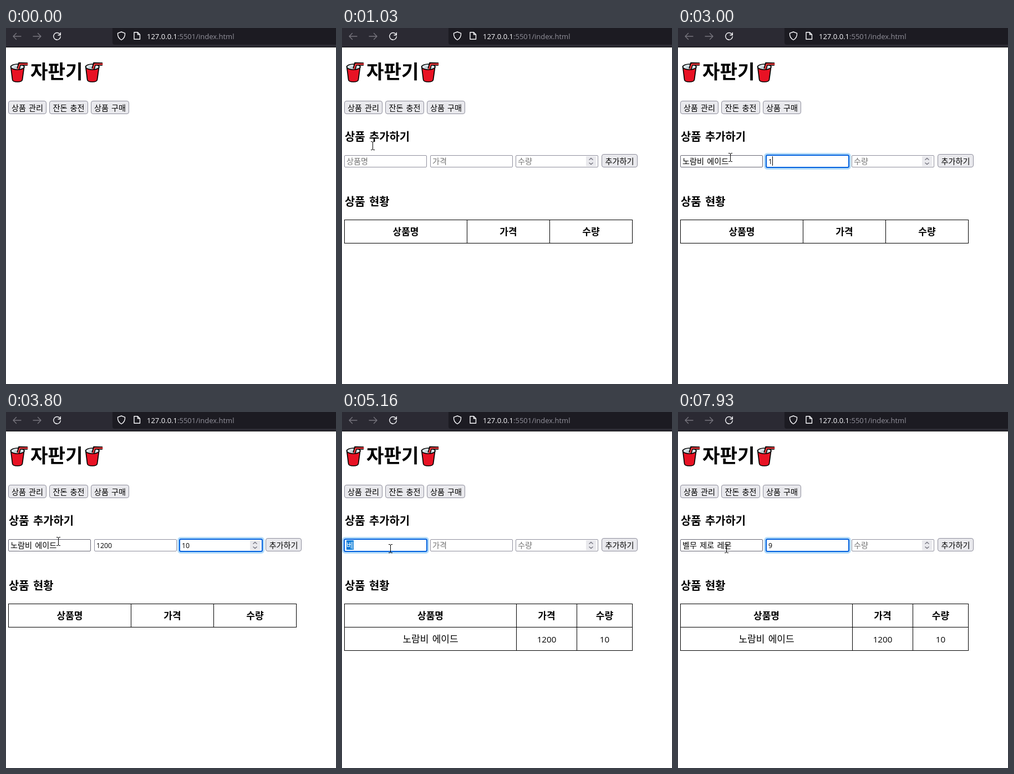
An HTML page for the animation above (7990 ms loop, 595 by 641 pixels).

```html
<!DOCTYPE html>
<html lang="ko">
<head>
<meta charset="utf-8">
<title>자판기</title>
<style>
html, body { margin: 0; width: 100%; height: 100%; overflow: hidden; background: #fff; }
svg { display: block; }
text { font: 14.13px "Noto Sans CJK KR", "Noto Sans KR", sans-serif; word-spacing: .09em; white-space: pre; }
.mid { text-anchor: middle; }
.bold { font-weight: 700; }
.h1 { font-size: 34.3px; }
.h3 { font-size: 19.9px; }
.cell { font-size: 17px; text-anchor: middle; }
.num { font-family: "Open Sans", "Noto Sans", sans-serif; font-size: 12.3px; }
.cell.num { font-size: 15.2px; }
.url { font: 13px "Open Sans", "Noto Sans", sans-serif; }
.icon { fill: none; stroke: #fbfbfe; stroke-width: 1.4; stroke-linecap: round; stroke-linejoin: round; }
.dim { stroke: #77767e; }
.line { fill: none; stroke: #000; }
.button { stroke: #8f8f9d; }
.box { fill: #fff; }
.halo { fill: none; stroke: #b5dcf8; stroke-width: 3; }
.ring { fill: none; stroke: #0060df; stroke-width: 2; }
</style>
</head>
<body>
<svg width="595" height="641" viewBox="0 0 595 641">
  <defs>
    <g id="cup" stroke="#000" stroke-width="1.7" stroke-linejoin="round">
      <path d="M8.6 69L11.6 93Q12 97 20.5 97T29.5 93L32.8 69Z" fill="#e81224"/>
      <ellipse cx="20.7" cy="70" rx="12.1" ry="5" fill="#dbe6ea"/>
      <path d="M13 71Q21 67 29 71Q21 75 13 71" fill="#bccbd2" stroke="none"/>
      <path d="M22 73.5L24.6 64.6L39 65" fill="none" stroke-width="5.6" stroke-linejoin="miter"/>
      <path d="M21.8 74L24.8 65L39.5 65" fill="none" stroke="#f03a3e" stroke-width="2.4"/>
    </g>
  </defs>

  <rect width="595" height="34" fill="#2b2a33"/>
  <rect y="34" width="595" height="1" fill="#0c0c0d"/>
  <rect x="192" y="-6" width="410" height="36" rx="4" fill="#1c1b22"/>
  <path class="icon dim" d="M27 15H13M18.5 9.5L13 15L18.5 20.5M49 15H63M57.5 9.5L63 15L57.5 20.5"/>
  <path class="icon" d="M97 11A6.3 6.3 0 1 0 98.3 15.5M98.3 8.5V12.8H94"/>
  <path class="icon" d="M208 7L214.5 9.3Q215.2 17.5 208 21.5Q200.800 17.5 201.500 9.300Z"/>
  <path class="icon" d="M231 7.700H237.500L241.500 11.700V20.300H231ZM237.500 7.700V11.700H241.500"/>
  <text class="url" x="254" y="20" fill="#fbfbfe">127.0.0.1<tspan fill="#92919b">:5501/index.html</tspan></text>

  <use href="#cup"/>
  <use href="#cup" x="135"/>
  <text class="h1 bold" x="44" y="91">자판기</text>
  <g id="menu"></g>

  <g id="page">
    <text class="h3 bold" x="5" y="203">상품 추가하기</text>
    <g id="form"></g>
    <text class="h3 bold" x="5" y="320">상품 현황</text>
    <g id="empty"></g>
    <g id="filled"></g>
  </g>

  <path id="arrow" d="M.5 .5V16.500L4.300 13L6.900 18.600L9.400 17.500L6.900 12H12Z" fill="#fff" stroke="#000"/>
  <path id="beam" class="line" d="M-3 -7.500H-1L.5 -6.500L2 -7.500H4M.5 -7V7M-3 7.500H-1L.5 6.500L2 7.500H4"/>
</svg>
<script>
const $ = id => document.getElementById(id);
const LOOP = 7990, OPEN = 940, SUBMIT = 4150;

const button = (x, y, w, label) =>
  `<rect class="button" x="${x + .5}" y="${y + .5}" width="${w - 1}" height="23" rx="3.500" fill="#e9e9ed"/>
   <text class="mid" x="${x + w / 2}" y="${y + 18}">${label}</text>`;

function table(split1, split2, rows) {
  const edges = [4.5, split1, split2, 523.5], bottom = 345.5 + rows.length * 42;
  const lines = edges.map(x => `M${x} 345V${bottom + .5}`).join('') +
    [0, ...rows.keys()].map((_, i) => `M4 ${345.5 + i * 42}H524`).join('');
  const cells = rows.map((row, r) => row.map((s, c) =>
    `<text class="cell ${r ? '' : 'bold'} ${/\d/.test(s) ? 'num' : ''}"
      x="${(edges[c] + edges[c + 1]) / 2}" y="${373.4 + r * 42}">${s}</text>`).join('')).join('');
  return `<path class="line" d="${lines}"/>` + cells;
}

const head = ['상품명', '가격', '수량'];
$('menu').innerHTML = button(4, 131, 69, '상품 관리') + button(78, 131, 70, '잔돈 충전') + button(153, 131, 69, '상품 구매');
$('empty').innerHTML = table(225.5, 374.5, [head]);
$('filled').innerHTML = table(314.5, 423.5, [head, ['노람비 에이드', '1200', '10']]);

const fieldX = [4, 159, 313];
$('form').innerHTML = fieldX.map(x => `<g>
  <rect class="halo" x="${x - 2.5}" y="226.500" width="154" height="27" rx="4.500"/>
  <rect class="box" x="${x + .5}" y="229.500" width="148" height="21" rx="1.500"/>
  <rect class="ring" x="${x}" y="229" width="149" height="22" rx="2"/>
  <rect class="mark" y="231" height="17"/>
  <text x="${x + 4}" y="245"></text></g>`).join('') +
  `<rect x="440" y="231" width="18" height="18" rx="1" fill="#e9e9ed"/>
   <path d="M445.500 237.500L449 234.500L452.500 237.500M445.500 242.500L449 245.500L452.500 242.500"
     fill="none" stroke="#73737f" stroke-width="1.400"/>` + button(468, 227, 65, '추가하기');

const fields = [...$('form').querySelectorAll('g')].map(g => ({
  halo: g.querySelector('.halo'), box: g.querySelector('.box'), ring: g.querySelector('.ring'),
  mark: g.querySelector('.mark'), text: g.querySelector('text')
}));
const menuButton = $('menu').querySelector('rect');

// Steps are [time, field, value]; "_" ends a value being composed, "|" shows the caret.
const type = (from, to, field, list, prefix = '') => {
  const parts = list.split(',');
  return parts.map((s, i) => [from + (to - from) * i / Math.max(1, parts.length - 1), field, prefix + s]);
};
const steps = [
  [1390, 0, '|'],
  [1610, 0, 'ㄴ_'],
  ...type(1800, 2120, 0, '노_,놀_,노라_,노람_,노람ㅂ_'),
  [2150, 0, '노람비_'],
  ...type(2220, 2570, 0, ' |,ㅇ_,에_,엥_,에이_,에읻_,에이드_', '노람비 '.trim()).map(([t, f, s], i) =>
    [t, f, i ? s.replace('노람비', '노람비 ') : s]),
  [2610, 1, '|'],
  ...type(3000, 3270, 1, '1|,12|,120|,1200|'),
  [3390, 2, '|'], [3520, 2, '1|'], [3610, 2, '10|'], [3800, 2, '10'],
  [SUBMIT, 0, ''], [SUBMIT, 1, ''], [SUBMIT, 2, '|'],
  [4740, 0, '|'],
  [4970, 0, 'ㅂ_'],
  ...type(5160, 5700, 0, '베_,벨_,벪_,벨무_,벨무 |,벨무 ㅈ_,벨무 제_,벨무 젤_,벨무 제로_'),
  [6070, 0, '벨무 제롤_'], [6100, 0, '벨무 제롤 |'], [6320, 0, '벨무 제롤|'],
  ...type(6450, 7000, 0, '|,ㄹ_,로_,로 |,로 ㄹ_,로 레_,로 렘_,로 레모_,로 레몬_', '벨무 제'),
  [7120, 1, '|'], [7530, 1, ''], [7800, 1, '9|'], [7930, 1, '9']
];

const path = [
  [60, 559, 628], [230, 510, 535], [400, 432, 436], [600, 210, 250], [790, 48, 143], [940, 48, 143],
  [1030, 55, 212], [1360, 94, 233], [SUBMIT, 94, 233], [4380, 95, 227], [4720, 87, 246], [LOOP, 87, 246]
];

function pointer(t) {
  const i = path.findIndex(p => p[0] > t);
  const [t0, x0, y0] = path[i - 1], [t1, x1, y1] = path[i], k = (t - t0) / (t1 - t0);
  return [Math.round(x0 + (x1 - x0) * k), Math.round(y0 + (y1 - y0) * k)];
}

const show = (node, on) => node.setAttribute('visibility', on ? 'inherit' : 'hidden');
const within = ([x, y], left, top, w, h) => x >= left && x < left + w && y >= top && y < top + h;

function drawField(i, value, focused, hover) {
  const { halo, box, ring, mark, text } = fields[i];
  const plain = value.replace(/[_|]$/, ''), composing = focused && value.endsWith('_');
  const caret = focused && value.endsWith('|');
  show(halo, focused);
  show(ring, focused);
  box.setAttribute('stroke', hover ? '#676774' : '#8f8f9d');

  text.setAttribute('class', /\d/.test(plain) ? 'num' : '');
  text.setAttribute('fill', plain ? '#000' : '#757575');
  const start = composing ? plain.slice(0, -1) : plain;
  text.textContent = start;
  const before = start ? text.getComputedTextLength() : 0;
  if (!plain) text.textContent = head[i];
  if (composing) {
    const last = document.createElementNS('http://www.w3.org/2000/svg', 'tspan');
    last.textContent = plain.slice(-1);
    last.setAttribute('fill', '#fff');
    text.append(last);
  }
  show(mark, composing || caret);
  mark.setAttribute('x', Math.round(fieldX[i] + 4 + before));
  mark.setAttribute('width', composing ? 13 : 1);
  mark.setAttribute('fill', composing ? '#0078d7' : '#000');
}

function draw(t) {
  const values = ['', '', ''];
  let focus = -1;
  for (const [at, field, value] of steps) {
    if (at > t) break;
    values[field] = value;
    focus = field;
  }
  const moving = t >= path[0][0], pos = moving ? pointer(t) : [0, 0];
  const beam = t >= 970, cursor = $(beam ? 'beam' : 'arrow');
  show($('arrow'), moving && !beam);
  show($('beam'), beam);
  cursor.setAttribute('transform', `translate(${pos})`);

  const over = moving && within(pos, 4, 131, 69, 24);
  menuButton.setAttribute('fill', !over ? '#e9e9ed' : t >= 880 && t < OPEN ? '#b1b1b9' : '#d0d0d7');
  show($('page'), t >= OPEN);
  show($('empty'), t < SUBMIT);
  show($('filled'), t >= SUBMIT);
  fields.forEach((_, i) => drawField(i, values[i], focus === i, within(pos, fieldX[i], 229, 149, 22)));
}

function frame() {
  draw(performance.now() % LOOP);
  requestAnimationFrame(frame);
}
frame();
</script>
</body>
</html>
```
